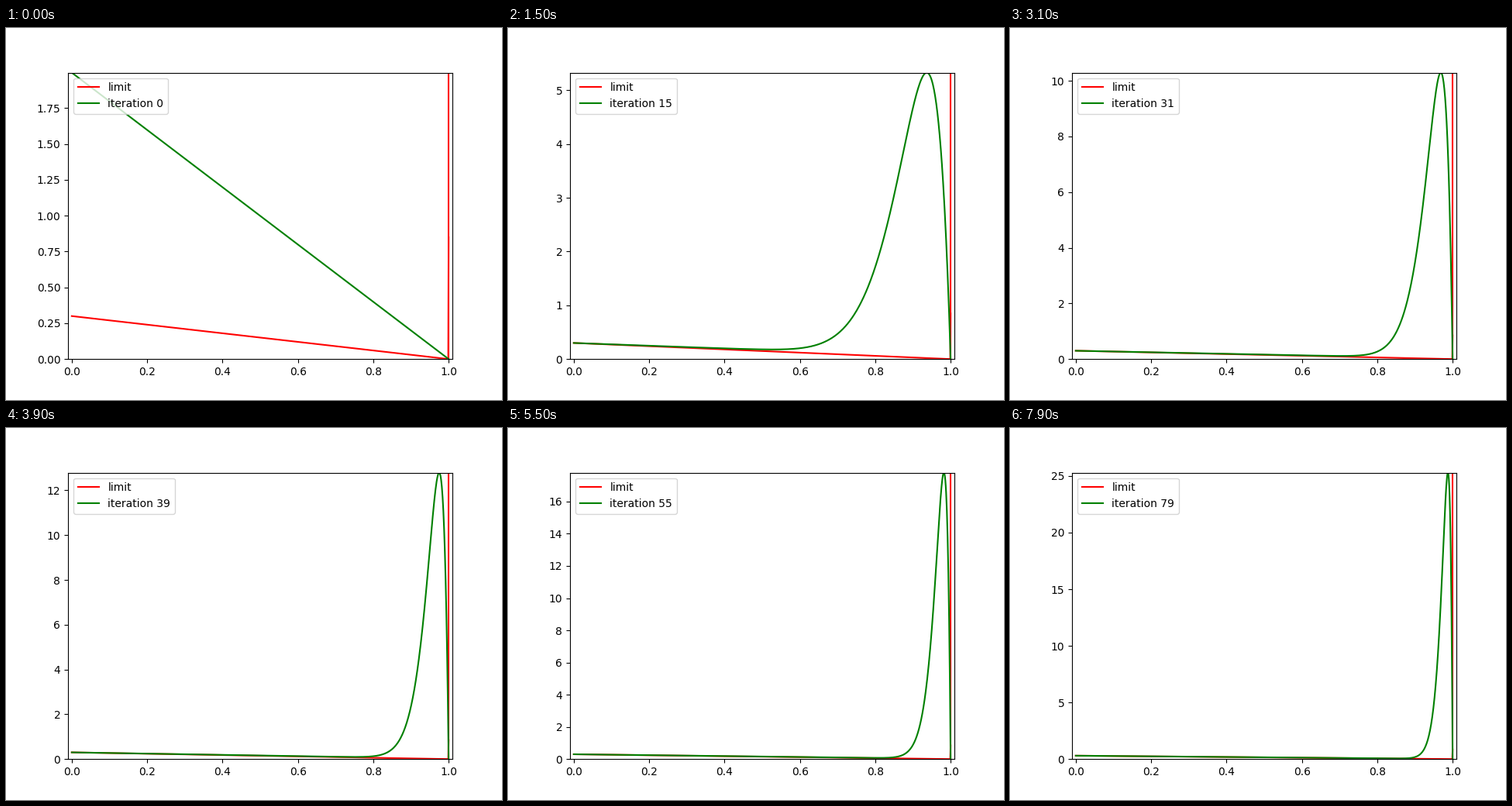
Write a matplotlib script that moves like this. It is 640 by 480 pixels and loops after 8 s.

```python
import numpy as np
import matplotlib.pyplot as plt
from matplotlib.animation import FuncAnimation

# Mutation-selection model: fitness-weighted selection plus a share of mutants.
STEPS = 80
BETA = 0.1
N = 1000

x = np.linspace(0, 1, N)
dx = x[1] - x[0]


def normalize(p):
    return p / (p.sum() * dx)


def iterate(p, mutants, steps):
    history = [p]
    for _ in range(steps - 1):
        mean_fitness = (x * p).sum() * dx
        p = (1 - BETA) * x * p / mean_fitness + BETA * mutants
        history.append(p)
    return history


densities = iterate(normalize(1 - x), normalize((1 - x) ** 2), STEPS)

# The limit is a smooth part plus the remaining mass condensed at x = 1.
limit = 3 * BETA * (1 - x)
limit[-1] = 0.85

fig, ax = plt.subplots(figsize=(6.4, 4.8), dpi=100)
ax.plot(x, limit, color="red", label="limit")
ax.axvline(1, color="red")
curve, = ax.plot(x, densities[0], color="green", label="iteration 0")
ax.set_xlim(-0.01, 1.01)
legend = ax.legend(loc="upper left")
caption = legend.get_texts()[1]


def update(n):
    p = densities[n]
    curve.set_ydata(p)
    ax.set_ylim(0, p.max())
    caption.set_text(f"iteration {n}")
    return curve, caption


anim = FuncAnimation(fig, update, frames=STEPS, interval=100,
                     repeat=True, repeat_delay=0, blit=False)
plt.show()
```
